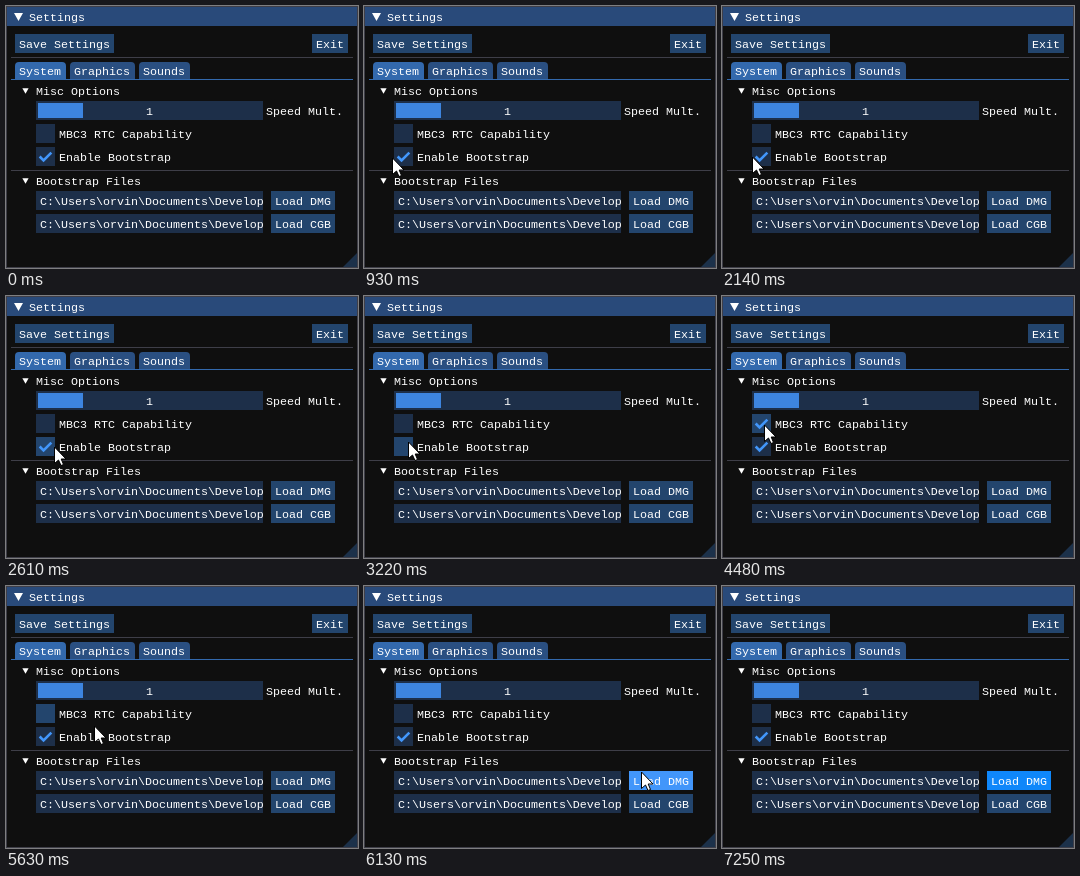
Recreate the animation shown at these times as an HTML page with a canvas. Size 352 px wide and 262 px high, loop 8 s.

```html
<!DOCTYPE html>
<html lang="en">
<head>
<meta charset="utf-8">
<title>Settings</title>
<style>
  html, body { margin: 0; width: 100%; height: 100%; overflow: hidden; background: #000; }
  canvas { display: block; width: 352px; height: 262px; }
</style>
</head>
<body>
<canvas id="stage" width="352" height="262"></canvas>
<script>
const ctx = document.getElementById('stage').getContext('2d');
const W = 352, H = 262;
const LOOP = 8000;
const HOLD = 150; // how long a click lasts
const LAG = 40;   // hover reacts a moment after the pointer

const C = {
  bg: 'rgb(15,15,15)',
  title: 'rgb(41,74,122)',
  line: 'rgb(62,62,72)',
  frame: 'rgb(29,47,73)',
  button: 'rgb(35,69,109)',
  pressedFrame: 'rgb(49,105,172)',
  tab: 'rgb(42,79,129)',
  activeTab: 'rgb(51,105,173)',
  grab: 'rgb(61,133,224)',
  accent: 'rgb(66,150,250)',
  active: 'rgb(15,135,250)',
  grip: 'rgb(28,49,74)'
};

// Where the pointer goes, and when it clicks there
const entry = { x: -10, y: 174 };
const stops = [
  { from: 500, to: 1020, x: 29, y: 150, clicks: [1570] },
  { from: 2130, to: 2620, x: 48, y: 150, clicks: [2650] },
  { from: 3120, to: 3220, x: 44, y: 145, clicks: [3550] },
  { from: 4040, to: 4220, x: 42, y: 128, clicks: [4330, 5070] },
  { from: 5610, to: 5810, x: 271, y: 184, clicks: [] },
  { from: 6030, to: 6130, x: 277, y: 185, clicks: [] },
  { from: 6200, to: 6330, x: 277, y: 194, clicks: [6390] },
  { from: 7090, to: 7250, x: 251, y: H, clicks: [] }
];

const easeOut = k => 1 - (1 - k) ** 2;
const inside = (p, r) =>
  p.x > r.x && p.x <= r.x + r.w && p.y >= r.y && p.y <= r.y + r.h;

function tipAt(t) {
  const i = stops.findLastIndex(s => t >= s.from);
  const a = stops[i - 1] || entry, b = stops[i] || entry;
  const k = i < 0 ? 0 : easeOut(Math.min(1, (t - b.from) / (b.to - b.from)));
  return {
    x: Math.round(a.x + (b.x - a.x) * k),
    y: Math.round(a.y + (b.y - a.y) * k)
  };
}

const isHeld = t => stops.some(s => s.clicks.some(c => t >= c && t < c + HOLD));

const clicksOn = (area, t) => stops
  .filter(s => inside(s, area))
  .flatMap(s => s.clicks)
  .filter(c => t >= c + HOLD).length;

function rect(x, y, w, h, color) {
  ctx.fillStyle = color;
  ctx.fillRect(x, y, w, h);
}

function poly(points, color) {
  ctx.beginPath();
  points.forEach(([x, y]) => ctx.lineTo(x, y));
  ctx.closePath();
  ctx.fillStyle = color;
  ctx.fill();
}

function text(s, x, y) {
  ctx.font = '11.67px "Liberation Mono", monospace';
  ctx.fillStyle = '#fff';
  ctx.fillText(s, x, y + 11);
}

function rule(y, color) {
  rect(5, y, W - 10, 1, color);
}

function button(s, x, y, color = C.button) {
  rect(x, y, s.length * 7 + 8, 19, color);
  text(s, x + 4, y + 3);
}

function tab(s, x, color) {
  ctx.beginPath();
  ctx.roundRect(x, 56, s.length * 7 + 9, 17, [4, 4, 0, 0]);
  ctx.fillStyle = color;
  ctx.fill();
  text(s, x + 4, 58);
}

function arrow(x, y, r) {
  const w = 0.866 * r, h = 0.75 * r;
  poly([[x, y + h], [x - w, y - h], [x + w, y - h]], '#fff');
}

function tree(s, y) {
  arrow(19.5, y + 7, 3.64);
  text(s, 30, y);
}

function checkMark(x, y) {
  ctx.beginPath();
  ctx.moveTo(x - 3.9, y - 3.9);
  ctx.lineTo(x, y);
  ctx.lineTo(x + 7.8, y - 7.8);
  ctx.strokeStyle = C.accent;
  ctx.lineWidth = 2.6;
  ctx.stroke();
}

function checkbox(s, y, t, startsOn) {
  const area = { x: 30, y, w: 23 + s.length * 7, h: 19 };
  const hover = inside(tipAt(t - LAG), area);
  rect(30, y, 19, 19, !hover ? C.frame : isHeld(t) ? C.pressedFrame : C.button);
  if ((clicksOn(area, t) + startsOn) % 2) checkMark(37.55, y + 13.4);
  text(s, 53, y + 3);
}

function loadButton(s, y, t) {
  const area = { x: 265, y, w: 64, h: 19 };
  const hover = inside(tipAt(t - LAG), area);
  const used = clicksOn(area, t + HOLD) > 0;
  button(s, area.x, y, used ? C.active : hover ? C.accent : C.button);
}

function input(y) {
  rect(30, y, 227, 19, C.frame);
  text('C:\\Users\\orvin\\Documents\\Develop', 34, y + 3);
}

function pointer({ x, y }, held) {
  if (held) {
    ctx.beginPath();
    ctx.arc(x, y, 12, 0, Math.PI * 2);
    ctx.fillStyle = 'rgba(255,255,0,0.47)';
    ctx.fill();
  }
  const shape = [[0, 0], [0, 16.5], [4, 13], [6.5, 18.5], [9, 17.5], [6.7, 12], [11.5, 12]];
  ctx.lineWidth = 1;
  ctx.strokeStyle = '#000';
  poly(shape.map(([a, b]) => [x + a + 0.5, y + b + 1]), '#fff');
  ctx.stroke();
}

function drawWindow() {
  rect(0, 0, W, H, C.line);
  rect(1, 1, W - 2, H - 2, C.bg);
  rect(1, 1, W - 2, 19, C.title);
  poly([[W - 15, H - 1], [W - 1, H - 15], [W - 1, H - 1]], C.grip);
  arrow(12.5, 11, 5.2);
  text('Settings', 23, 4);

  button('Save Settings', 9, 28);
  button('Exit', 306, 28);
  rule(51, C.line);

  tab('System', 9, C.activeTab);
  tab('Graphics', 64, C.tab);
  tab('Sounds', 133, C.tab);
  rule(73, C.activeTab);
}

function draw(t) {
  drawWindow();

  tree('Misc Options', 78);
  rect(30, 95, 227, 19, C.frame);
  rect(32, 97, 45, 15, C.grab);
  text('1', 140, 98);
  text('Speed Mult.', 260, 98);
  checkbox('MBC3 RTC Capability', 118, t, 0);
  checkbox('Enable Bootstrap', 141, t, 1);

  rule(164, C.line);
  tree('Bootstrap Files', 168);
  input(185);
  input(208);
  loadButton('Load DMG', 185, t);
  loadButton('Load CGB', 208, t);

  if (t >= stops[0].from && t < stops.at(-1).to) pointer(tipAt(t), isHeld(t));
}

const start = performance.now();
function tick() {
  draw((performance.now() - start) % LOOP);
  requestAnimationFrame(tick);
}
tick();
</script>
</body>
</html>
```
